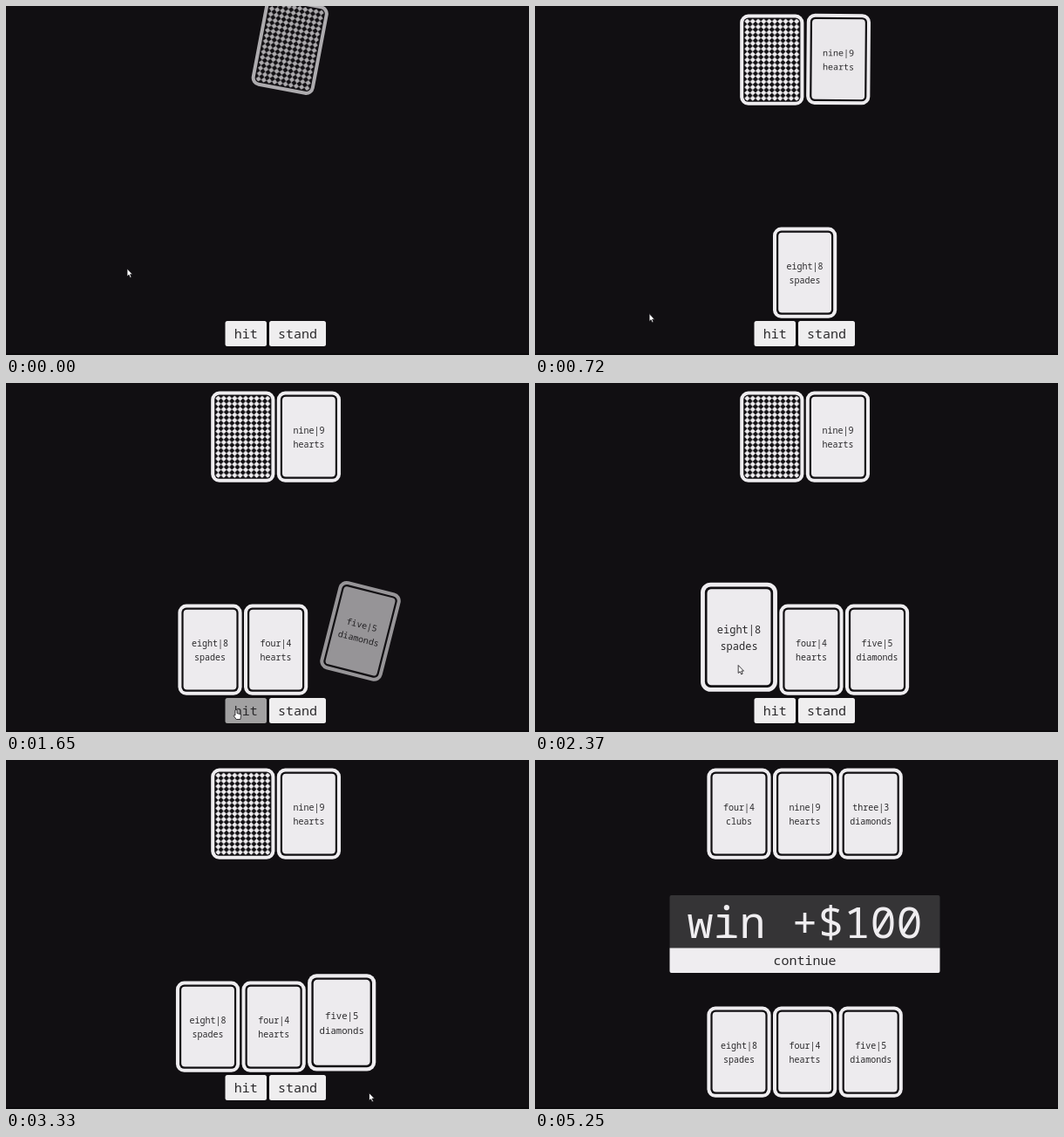
Animation, 600 px wide and 400 px high, one loop 5460 ms. Source, as an HTML page:

```html
<!DOCTYPE html>
<html lang="en">
<head>
<meta charset="utf-8">
<title>Blackjack hand</title>
<style>
  html, body { margin: 0; width: 100%; height: 100%; overflow: hidden; background: #110f12; }
  svg { display: block; width: 100%; height: 100%; }
  text { font-family: "Noto Sans Mono", "DejaVu Sans Mono", monospace; text-anchor: middle; fill: #2b2a2c; white-space: pre; }
</style>
</head>
<body>
<svg id="stage" viewBox="0 0 600 400">
  <defs>
    <pattern id="diamonds" x="-31.5" y="-47.25" width="6.3" height="6.3" patternUnits="userSpaceOnUse">
      <path d="M3.15 0L6.3 3.15 3.15 6.3 0 3.15z" fill="#efedf0"/>
    </pattern>
  </defs>
  <rect width="600" height="400" fill="#110f12"/>
  <rect y="398" width="600" height="2" fill="#0b0a0c"/>
  <g id="buttons"></g>
  <g id="cards"></g>
  <g id="panel">
    <rect x="154.5" y="155" width="310" height="62" rx="2" fill="#353436"/>
    <path d="M154.5 215.5h310v26.500q0 2-2 2h-306q-2 0-2-2z" fill="#efedf0"/>
    <text x="309.5" y="204" font-size="50" style="fill:#efedf0">win +$100</text>
    <text x="309.5" y="235" font-size="15">continue</text>
  </g>
  <g id="cursor" stroke="#110f12" stroke-width=".8" stroke-linejoin="round" fill="#fff">
    <path id="arrow" d="M0 0V9L2 7.200 3.500 10.400 5 9.700 3.600 6.600H6.300z"/>
    <path id="hand" d="M-1.500 0Q-.3-1.500.6 0V3.600L4 4.400Q5.300 4.800 5.100 6.400L4.400 10.500H-.2L-3.200 6.600Q-3.300 5.200-1.500 6z"/>
  </g>
</svg>
<script>
const LOOP = 5460, FADE = 300, MID = 309.6;
const W = 73.2, H = 104.2, GAP = 2.4;
const SLIDE = 54, TILT = 36;
const STAND = 3570, PANEL = 4330;
const $ = id => document.getElementById(id);

function add(parent, tag, attrs = {}, text) {
  const el = document.createElementNS("http://www.w3.org/2000/svg", tag);
  for (const key in attrs) el.setAttribute(key, attrs[key]);
  if (text) el.textContent = text;
  parent.appendChild(el);
  return el;
}

function show(el, on) {
  el.setAttribute("visibility", on ? "inherit" : "hidden");
}

// The CSS "ease" curve, cubic-bezier(.25, .1, .25, 1).
function ease(x) {
  if (x <= 0) return 0;
  if (x >= 1) return 1;
  const bezier = (a, b, u) => 3 * a * u * (1 - u) ** 2 + 3 * b * u * u * (1 - u) + u ** 3;
  let lo = 0, hi = 1;
  for (let i = 0; i < 20; i++) {
    const u = (lo + hi) / 2;
    if (bezier(.25, .25, u) < x) lo = u; else hi = u;
  }
  return bezier(.1, 1, lo);
}

const between = (t, [on, off]) => ease((t - on) / FADE) - ease((t - off) / FADE);

function inset(parent, d, r, fill) {
  return add(parent, "rect", {
    x: -W / 2 + d, y: -H / 2 + d, width: W - 2 * d, height: H - 2 * d, rx: r, fill
  });
}

function makeCard(rank, suit, start, hover, hidden) {
  const g = add($("cards"), "g");
  inset(g, 0, 9.5, "#efedf0");
  inset(g, 4, 5.5, "#110f12");
  const face = add(g, "g");
  inset(face, 6.2, 4, "#edebee");
  add(face, "text", { y: -3.7, "font-size": 10 }, rank);
  add(face, "text", { y: 12.3, "font-size": 10 }, suit);
  const back = hidden && inset(g, 5.1, 4, "url(#diamonds)");
  return { g, face, back, start, hover };
}

function makeButton(label, x, width, hover) {
  const g = $("buttons");
  const box = add(g, "rect", { x, y: 361, width, height: 29, rx: 2.5 });
  add(g, "text", { x: x + width / 2, y: 381, "font-size": 15 }, label);
  return { box, hover };
}

const dealer = [
  makeCard("four|4", "clubs", -123, null, true),
  makeCard("nine|9", "hearts", 465),
  makeCard("three|3", "diamonds", 3770)
];
const player = [
  makeCard("eight|8", "spades", 172, [2050, 2600]),
  makeCard("four|4", "hearts", 762, [2600, 2900]),
  makeCard("five|5", "diamonds", 1546, [2900, 3215])
];
const buttons = [
  makeButton("hit", 251.5, 47.5, [1400, 1790]),
  makeButton("stand", 302, 65, [3430, STAND])
];

// Pointer path: time, x, y.
const path = [
  [0, 139, 301], [300, 127, 315], [570, 114, 340], [720, 131, 352.500],
  [1140, 152, 366], [1400, 252, 377], [1540, 265, 375], [1740, 264, 375],
  [1830, 235, 366], [1950, 181, 346], [2060, 198, 332], [2370, 233, 323.500],
  [2600, 275, 322], [2900, 353, 324], [3100, 400, 335], [3215, 412, 358],
  [3330, 417, 381.500], [3430, 366, 382], [3500, 342, 378], [STAND, 340, 378],
  [3750, 348, 412]
];

function pointer(t) {
  const i = path.findIndex(p => p[0] > t);
  if (i < 0) return path[path.length - 1].slice(1);
  const [t0, x0, y0] = path[i - 1], [t1, x1, y1] = path[i];
  const k = (t - t0) / (t1 - t0);
  return [x0 + (x1 - x0) * k, y0 + (y1 - y0) * k];
}

// Centre the dealt cards in a row; hovered ones grow and push the rest aside.
function layRow(cards, bottom, t) {
  const dealt = cards.filter(c => t >= c.start);
  const scales = dealt.map(c => c.hover ? 1 + .2 * between(t, c.hover) : 1);
  const total = scales.reduce((sum, s) => sum + W * s, GAP * (dealt.length - 1));
  let x = MID - total / 2;
  cards.forEach(c => show(c.g, t >= c.start));
  dealt.forEach((c, i) => {
    const s = scales[i], k = 1 - ease((t - c.start) / FADE);
    const cx = x + W * s / 2 + SLIDE * k;
    const cy = bottom - 20 * (s - 1) - H * s / 2 - SLIDE * k;
    c.g.setAttribute("transform", `translate(${cx} ${cy}) rotate(${TILT * k}) scale(${s})`);
    c.g.setAttribute("opacity", 1 - k);
    x += W * s + GAP;
  });
}

function draw(t) {
  const playing = t < STAND;
  layRow(dealer, 113.8, t);
  layRow(player, playing ? 357.8 : 386.8, t);
  show(dealer[0].back, playing);
  show(dealer[0].face, !playing);

  show($("buttons"), playing);
  for (const b of buttons) {
    const v = Math.round(239 - 78 * between(t, b.hover));
    b.box.setAttribute("fill", `rgb(${v},${v - 1},${v})`);
  }

  const [x, y] = pointer(t);
  const over = buttons.some(b => t >= b.hover[0] && t < b.hover[1]);
  $("cursor").setAttribute("transform", `translate(${x} ${y})`);
  show($("cursor"), y < 402);
  show($("hand"), over);
  show($("arrow"), !over);

  $("panel").setAttribute("opacity", ease((t - PANEL) / FADE));
}

const begin = performance.now();
function tick() {
  draw((performance.now() - begin) % LOOP);
  requestAnimationFrame(tick);
}
tick();
</script>
</body>
</html>
```
